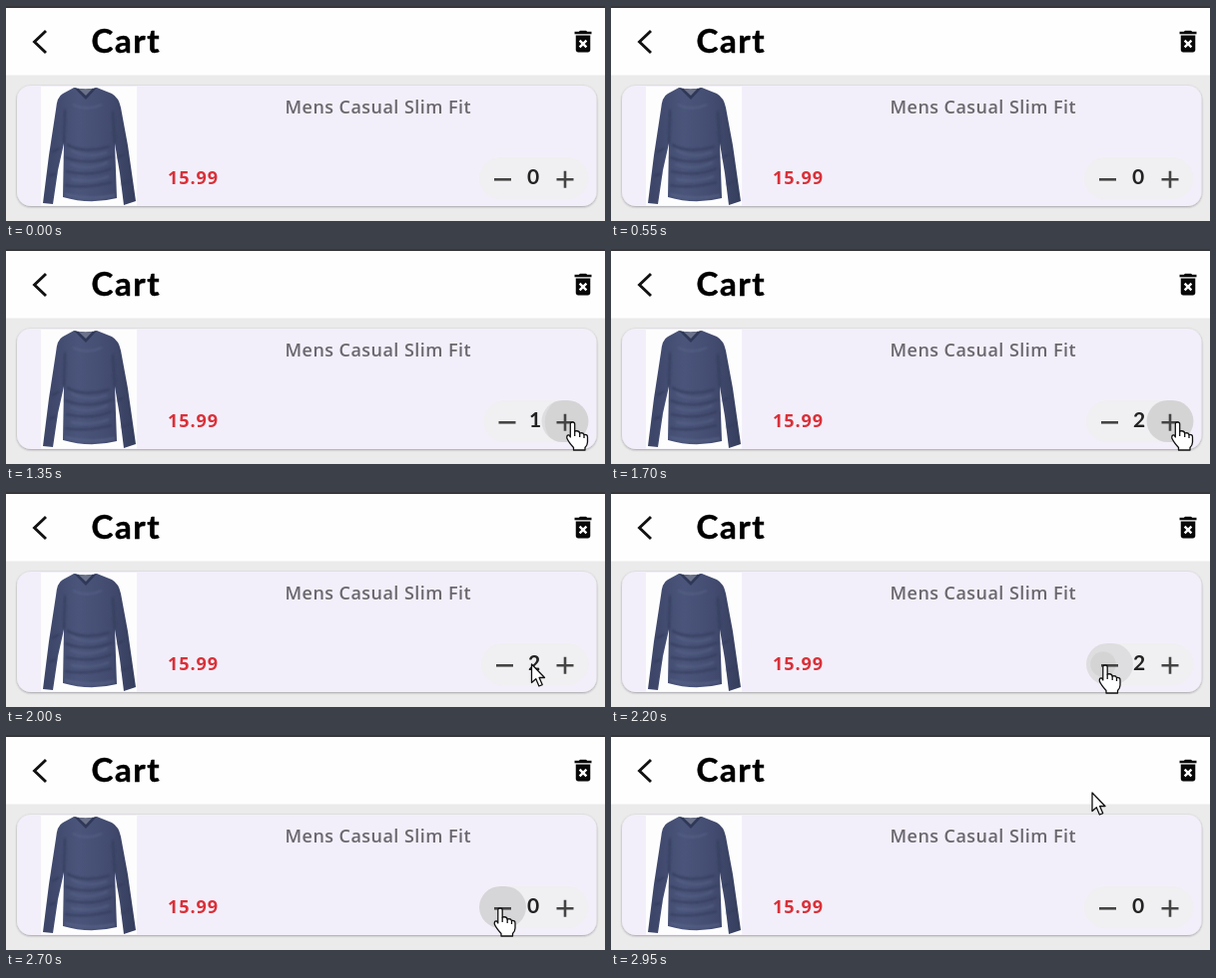
An HTML page that plays this animation: 600x216 px, repeating every 3050 ms.

```html
<!DOCTYPE html>
<html lang="en">
<head>
<meta charset="utf-8">
<title>Cart</title>
<style>
  html, body { margin: 0; width: 100%; height: 100%; overflow: hidden; background: #ebebeb; }
  svg { display: block; width: 100%; height: 100%; }
  text { font-family: "Open Sans", "Noto Sans", sans-serif; }
  .heading { font: 700 33px Lato, sans-serif; letter-spacing: 1.6px; stroke: #000; stroke-width: .5; }
  .name { font-size: 18px; font-weight: 600; letter-spacing: .45px; fill: #6b686f; }
  .price { font-size: 18px; font-weight: 700; letter-spacing: .95px; fill: #da3038; }
  .count { font: 700 21px Lato, sans-serif; fill: #222; text-anchor: middle; }
  .line { fill: none; stroke: #444; stroke-width: 2.6; }
  .cursor { fill: #fff; stroke: #111; stroke-width: 1.3; stroke-linejoin: round; }
</style>
</head>
<body>
<svg viewBox="0 0 600 216">
  <defs>
    <filter id="shadow" x="-5%" y="-10%" width="110%" height="125%">
      <feDropShadow dx="0" dy=".8" stdDeviation=".9" flood-color="#25202e" flood-opacity=".42"/>
    </filter>
    <filter id="soft"><feGaussianBlur stdDeviation=".8"/></filter>
    <linearGradient id="cloth">
      <stop offset="0" stop-color="#3b4466"/>
      <stop offset=".38" stop-color="#4b557b"/>
      <stop offset=".7" stop-color="#434c70"/>
      <stop offset="1" stop-color="#363e5d"/>
    </linearGradient>
    <clipPath id="minusClip"><rect id="minusShape" y="152" width="47" height="42" rx="21"/></clipPath>
    <clipPath id="plusClip"><rect x="536.5" y="152" width="47" height="42" rx="21"/></clipPath>
  </defs>

  <rect width="600" height="216" fill="#ebebeb"/>
  <rect width="600" height="69.5" fill="#fefefe"/>
  <rect width="600" height="2" fill="#37363a"/>
  <path d="M40 25L28.5 36 40 47" fill="none" stroke="#111" stroke-width="2.9"/>
  <text class="heading" x="85.5" y="46.8">Cart</text>
  <path transform="translate(563.5 21) scale(1.21)" fill="#080808" d="M6 19c0 1.1.9 2 2 2h8c1.1 0 2-.9 2-2V7H6zM8.5 11.9l1.4-1.4L12 12.6l2.1-2.1 1.4 1.4L13.4 14l2.1 2.1-1.4 1.4L12 15.4l-2.1 2.1-1.4-1.4L10.6 14zM15.5 4l-1-1h-5l-1 1H5v2h14V4z" fill-rule="evenodd"/>

  <rect x="11" y="80" width="580.5" height="121" rx="14" fill="#f3effa" filter="url(#shadow)"/>

  <rect x="35" y="81" width="96" height="119.5" fill="#fdfdfe"/>
  <path fill="url(#cloth)" d="M68 82Q80 86 91 82L106 88Q113 92 115 102L122 140 130 196 118 200 114 168 109 138 111 193Q84 200 57 192L58 138 52 165 47 199 37 198 43 150 50 104Q51 91 57 88Z"/>
  <path fill="#2f3857" d="M68 82Q80 85 91 82L80 94Z"/>
  <path fill="#6b7189" d="M72 82.5Q80 85 87 82.5L80 90Z"/>
  <g fill="none" filter="url(#soft)">
    <path stroke="#333b5a" stroke-width="1.7" d="M59 104L58 138M107 106L109 138M61 139Q76 149 104 141M59 152Q82 161 107 151M60 166Q85 172 106 163M59 180Q78 184 106 177M46 147L53 143M117 149L112 153M43 171L50 168M124 176L116 179"/>
    <path stroke="#5a658b" stroke-width="1.3" d="M67 99Q80 106 96 99M65 145Q82 154 101 147M64 159Q83 166 102 157M65 174Q85 178 103 171M59 189Q84 196 109 190"/>
  </g>

  <text class="name" x="279.5" y="108">Mens Casual Slim Fit</text>
  <text class="price" x="162" y="179">15.99</text>

  <rect id="pill" y="152" height="42" rx="21" fill="#f0eff1"/>
  <g clip-path="url(#minusClip)">
    <rect id="minusHover" x="470" y="150" width="60" height="46"/>
    <circle id="minusRipple" cx="493" cy="173"/>
  </g>
  <g clip-path="url(#plusClip)">
    <rect id="plusHover" x="530" y="150" width="60" height="46"/>
    <circle id="plusRipple" cx="566" cy="174"/>
  </g>
  <path id="minus" class="line" d="M-8.5 174.3H8.5"/>
  <path class="line" d="M551.5 174.3H568.5M560 165.8V182.8"/>
  <text id="count" class="count" y="179"></text>

  <path id="arrow" class="cursor" d="M0 0V18.5L4.3 14.7 7.4 22 10.7 20.6 7.6 13.5H13Z"/>
  <g id="hand" class="cursor">
    <path d="M-2.2 2Q-2.2 0 0 0T2.2 2V9Q6.5 8 7.2 11 10.5 10 11.5 12.5 15 12 15 15V20Q15 23 12.5 25.5V28H1V25.5Q-4 20 -5.7 16 -6 12.5 -3.5 13L-2.2 15Z"/>
    <path fill="none" d="M2.2 9V14M7.2 11V15M11.5 12.5V16"/>
  </g>
</svg>
<script>
  const LOOP = 3050, STEP = 50;
  const $ = id => document.getElementById(id);
  const set = (id, attrs) => {
    for (const name in attrs) $(id).setAttribute(name, attrs[name]);
  };
  const clamp = v => Math.max(0, Math.min(1, v));

  // time, x, y of the pointer tip
  const route = [
    [950, 451, 214], [1000, 480, 206], [1100, 545, 184], [1200, 567.5, 174],
    [1850, 567.5, 174], [1950, 545, 173], [2050, 508, 173], [2100, 495, 174],
    [2700, 495, 174], [2800, 494, 148], [2900, 487, 90], [2950, 482, 58]
  ];
  const counts = [[0, 0], [1300, 1], [1550, 2], [2250, 1], [2500, 0]];
  // per count: centre of the minus sign, centre of the digit
  const layout = [[497.5, 528], [502, 530], [499.5, 529]];
  const buttons = {
    plus: { enter: 1100, leave: 1900, presses: [1200, 1450] },
    minus: { enter: 2050, leave: 2750, presses: [2150, 2400] }
  };

  function pointerAt(t) {
    if (t < route[0][0]) return null;
    const i = route.findIndex(p => p[0] > t);
    if (i < 0) return route.at(-1).slice(1);
    const a = route[i - 1], b = route[i], k = (t - a[0]) / (b[0] - a[0]);
    return [a[1] + (b[1] - a[1]) * k, a[2] + (b[2] - a[2]) * k];
  }

  function drawButton(name, t) {
    const { enter, leave, presses } = buttons[name];
    const hover = clamp((t - enter) / 100) * clamp(1 - (t - leave) / 100);
    set(name + "Hover", { "fill-opacity": 0.075 * hover });
    const press = presses.filter(p => p <= t).at(-1) ?? Infinity;
    const age = t - press;
    set(name + "Ripple", {
      r: age > 0 ? 6 + 34 * clamp(age / 250) : 0,
      "fill-opacity": 0.045 * clamp(1 - (age - 250) / 200)
    });
  }

  function render(time) {
    const t = Math.min(Math.floor(time % LOOP / STEP) * STEP, LOOP - 2 * STEP);
    const count = counts.filter(c => c[0] <= t).at(-1)[1];
    const [minusX, digitX] = layout[count];
    const left = minusX - 23.5;
    set("pill", { x: left, width: 583.5 - left });
    set("minusShape", { x: left });
    set("minus", { transform: `translate(${minusX} 0)` });
    set("count", { x: digitX });
    $("count").textContent = count;
    drawButton("plus", t);
    drawButton("minus", t);

    const tip = pointerAt(t);
    const overButton = tip && Object.values(buttons).some(b => t >= b.enter && t < b.leave);
    set("hand", { visibility: overButton ? "visible" : "hidden" });
    set("arrow", { visibility: tip && !overButton ? "visible" : "hidden" });
    if (tip) set(overButton ? "hand" : "arrow", { transform: `translate(${tip})` });
  }

  const start = performance.now();
  function tick() {
    render(performance.now() - start);
    requestAnimationFrame(tick);
  }
  tick();
</script>
</body>
</html>
```
